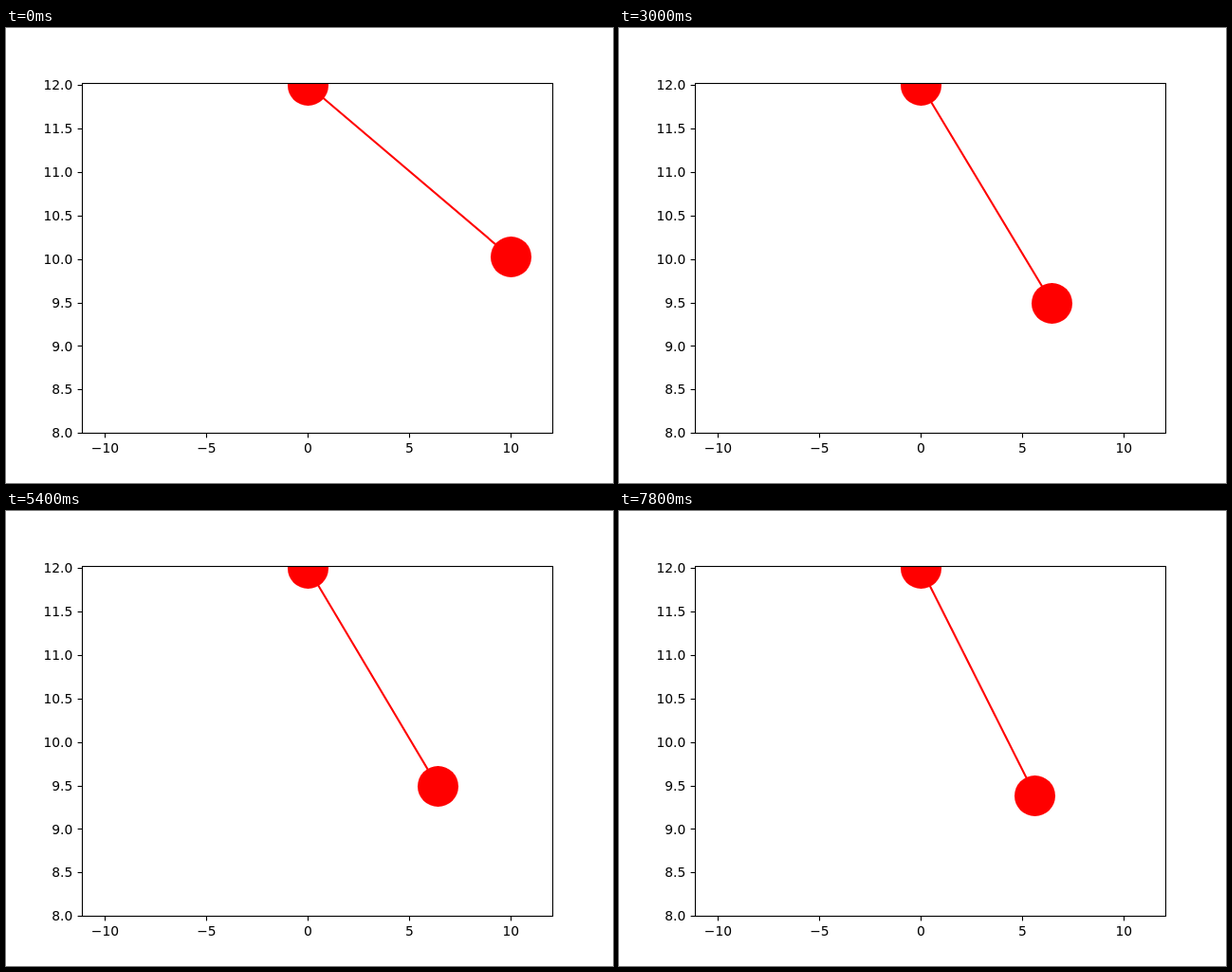
Animation of 640x480 px, one loop 8000 ms. Source, as an HTML page:

```html
<!DOCTYPE html>
<html lang="en">
<head>
<meta charset="utf-8">
<title>Damped pendulum</title>
<style>
  html, body { margin: 0; width: 100%; height: 100%; overflow: hidden; background: #fff; }
  svg { display: block; width: 640px; height: 480px; }
  text { font: 13.89px "DejaVu Sans", sans-serif; }
  .axis { fill: none; stroke: #000; stroke-width: 1.11; }
</style>
</head>
<body>
<svg viewBox="0 0 640 480">
  <clipPath id="plot"><rect x="80" y="58" width="496" height="369"/></clipPath>
  <g clip-path="url(#plot)" fill="#f00">
    <line id="rod" stroke="#f00" stroke-width="2.083"/>
    <circle id="pivot" r="21.5"/>
    <circle id="bob" r="21.5"/>
  </g>
  <g id="ticks"></g>
  <rect class="axis" x="80.5" y="58.5" width="496" height="369"/>
</svg>
<script>
const STEP = 200, STEPS = 40;
const $ = id => document.getElementById(id);
const px = x => 318.4 + 21.39 * x;
const py = y => 427.2 - 91.73 * (y - 8);
const snap = v => Math.floor(v) + 0.5;

// Turning points of the swing: [step, x]
const turns = [
  [0.25, 10], [7.12, -9.12], [13.4, 8.87], [19.64, -7.93],
  [25.78, 7.73], [31.79, -6.91], [37.8, 6.78], [43.7, -5.95]
];

function add(name, attrs, text = '') {
  const el = document.createElementNS('http://www.w3.org/2000/svg', name);
  set(el, attrs);
  el.textContent = text;
  $('ticks').append(el);
}

function set(el, attrs) {
  for (const key in attrs) el.setAttribute(key, attrs[key]);
}

function drawTicks() {
  for (let x = -10; x <= 10; x += 5) {
    add('path', { class: 'axis', d: `M${snap(px(x))} 428v4.4` });
    add('text', { x: px(x), y: 448, 'text-anchor': 'middle' }, String(x).replace('-', '\u2212'));
  }
  for (let y = 8; y <= 12; y += 0.5) {
    add('path', { class: 'axis', d: `M80 ${Math.round(py(y)) + 0.5}h-4.4` });
    add('text', { x: 70.3, y: Math.round(py(y) + 5.1), 'text-anchor': 'end' }, y.toFixed(1));
  }
}

// Cosine between turning points, lingering slightly at each end
function swing(n) {
  let i = 0;
  while (n > turns[i + 1][0]) i++;
  const [n0, x0] = turns[i], [n1, x1] = turns[i + 1];
  const s = Math.max(0, (n - n0) / (n1 - n0));
  const phase = Math.PI * s - 0.03 * Math.sin(2 * Math.PI * s);
  return (x0 + x1) / 2 + (x0 - x1) / 2 * Math.cos(phase);
}

function draw(ms) {
  const x = swing(Math.floor(ms / STEP) % STEPS);
  const bx = px(x), by = py(10.02 - Math.cos(x * Math.PI / 20));
  set($('rod'), { x2: bx, y2: by });
  set($('bob'), { cx: snap(bx), cy: snap(by) });
}

drawTicks();
set($('rod'), { x1: px(0), y1: py(12) });
set($('pivot'), { cx: snap(px(0)), cy: snap(py(12)) });

const start = performance.now();
function tick() {
  draw(performance.now() - start);
  requestAnimationFrame(tick);
}
tick();
</script>
</body>
</html>
```
